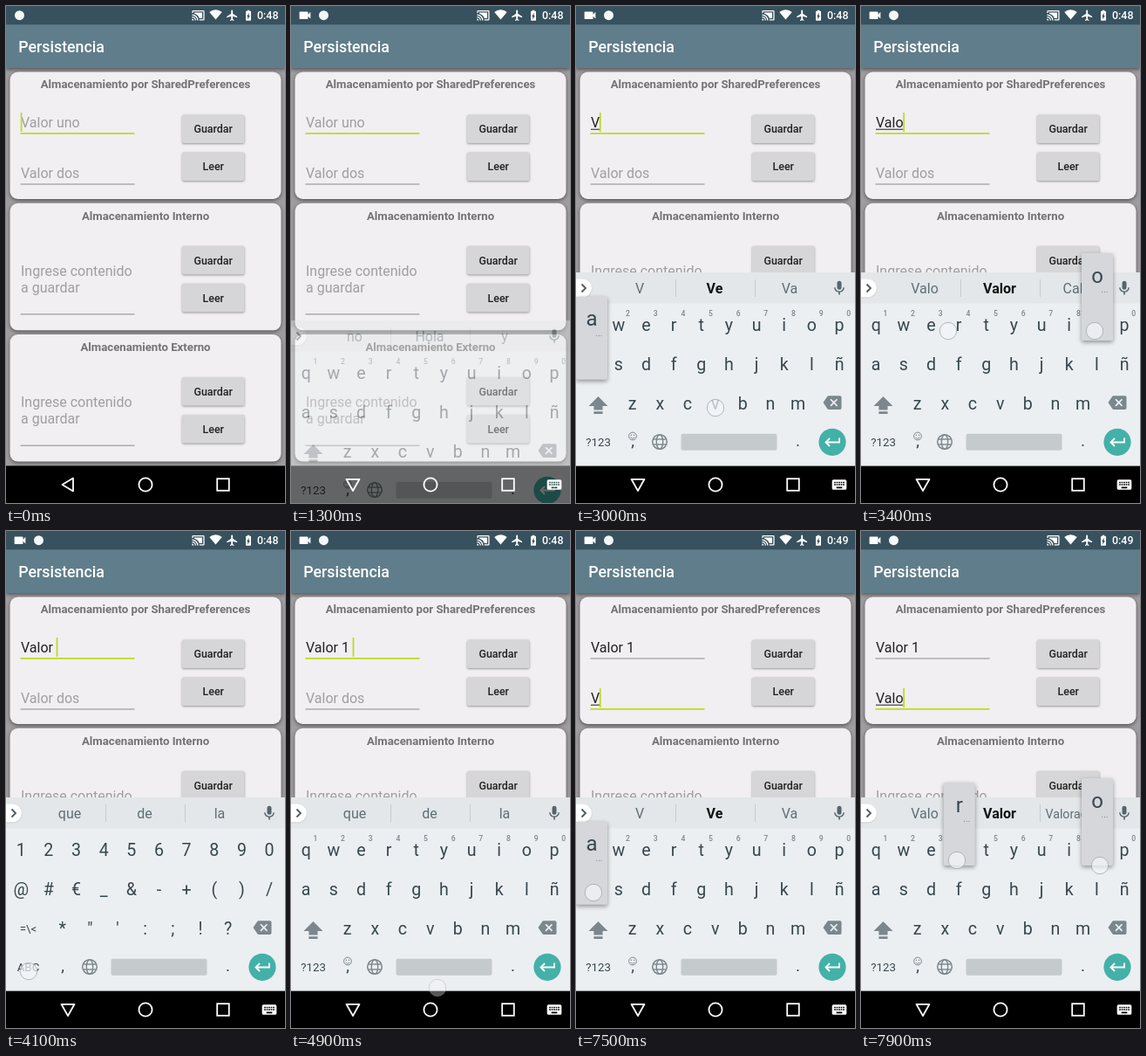
Animation of 320x569 px, one loop 8000 ms. Source, as an HTML page with a canvas:

```html
<!DOCTYPE html>
<html lang="es">
<head>
<meta charset="utf-8">
<title>Persistencia</title>
<style>
html, body { margin: 0; width: 100%; height: 100%; overflow: hidden; background: #000; }
canvas { display: block; width: 320px; height: 569px; }
</style>
</head>
<body>
<canvas id="stage"></canvas>
<script>
const W = 320, H = 569, LOOP = 8000;
const dpr = window.devicePixelRatio || 1;
const FONT = 'Roboto, "Noto Sans", sans-serif';
const GREEN = '#bddb27', KEY = '#37474f', GREY = '#7b878d', TEAL = '#43b1a8';

const stage = document.getElementById('stage');
const layer = document.createElement('canvas');
for (const c of [stage, layer]) { c.width = W * dpr; c.height = H * dpr; }
const main = stage.getContext('2d');
const kb = layer.getContext('2d');
main.scale(dpr, dpr);
kb.scale(dpr, dpr);
let g = main;

const ICON = {
  cast: 'M21 3H3a2 2 0 0 0-2 2v3h2V5h18v14h-7v2h7a2 2 0 0 0 2-2V5a2 2 0 0 0-2-2zM1 18v3h3a3 3 0 0 0-3-3zm0-4v2a5 5 0 0 1 5 5h2a7 7 0 0 0-7-7zm0-4v2a9 9 0 0 1 9 9h2A11 11 0 0 0 1 10zM5 7h14v10h-5a13 13 0 0 0-9-8z',
  wifi: 'M12 21 24 7a18 18 0 0 0-24 0z',
  plane: 'M21 16v-2l-8-5V3.5a1.5 1.5 0 0 0-3 0V9l-8 5v2l8-2.5V19l-2 1.5V22l3.5-1 3.5 1v-1.5L13 19v-5.5z',
  battery: 'M15.7 4H14V2h-4v2H8.3Q7 4 7 5.3v15.4Q7 22 8.3 22h7.4q1.3 0 1.3-1.3V5.3Q17 4 15.7 4zM11 20v-5.5H9L13 7v5.5h2z',
  camera: 'M17 10.5V7a1 1 0 0 0-1-1H4a1 1 0 0 0-1 1v10a1 1 0 0 0 1 1h12a1 1 0 0 0 1-1v-3.5l4 4v-11z',
  mic: 'M12 14a3 3 0 0 0 3-3V5a3 3 0 0 0-6 0v6a3 3 0 0 0 3 3zm5.3-3c0 3-2.5 5.1-5.3 5.1S6.7 14 6.7 11H5c0 3.4 2.7 6.2 6 6.7V21h2v-3.3c3.3-.5 6-3.3 6-6.7z',
  back: 'M22 3H7Q6 3 5.4 3.9L0 12l5.4 8.1Q6 21 7 21h15a2 2 0 0 0 2-2V5a2 2 0 0 0-2-2zm-3 12.6L17.6 17 14 13.4 10.4 17 9 15.6 12.6 12 9 8.4 10.4 7 14 10.6 17.6 7 19 8.4 15.4 12z',
  shift: 'M12 1 0 13h6.500v5h11v-5H24zM6.500 20h11v3h-11z',
  board: 'M20 5H4a2 2 0 0 0-2 2v10a2 2 0 0 0 2 2h16a2 2 0 0 0 2-2V7a2 2 0 0 0-2-2zm-9 3h2v2h-2zm0 3h2v2h-2zM8 8h2v2H8zm0 3h2v2H8zm-1 2H5v-2h2zm0-3H5V8h2zm9 7H8v-2h8zm0-4h-2v-2h2zm0-3h-2V8h2zm3 3h-2v-2h2zm0-3h-2V8h2z'
};
for (const k in ICON) ICON[k] = new Path2D(ICON[k]);

function icon(name, x, y, size, color) {
  g.save();
  g.translate(x - size / 2, y - size / 2);
  g.scale(size / 24, size / 24);
  g.fillStyle = color;
  g.fill(ICON[name], 'evenodd');
  g.restore();
}

function text(s, x, y, size, color, weight = 400, align = 'left') {
  g.font = `${weight} ${size}px ${FONT}`;
  g.fillStyle = color;
  g.textAlign = align;
  g.fillText(s, x, y);
}
const mid = (s, x, y, size, color, weight) => text(s, x, y, size, color, weight, 'center');

function rect(x, y, w, h, color) {
  g.fillStyle = color;
  g.fillRect(x, y, w, h);
}

function box(x, y, w, h, r, color, blur = 0, dy = 0, shade = 'rgba(0,0,0,.4)') {
  g.save();
  if (blur) {
    g.shadowColor = shade;
    g.shadowBlur = blur * dpr;
    g.shadowOffsetY = dy * dpr;
  }
  g.fillStyle = color;
  g.beginPath();
  g.roundRect(x, y, w, h, r);
  g.fill();
  g.restore();
}

function disc(x, y, r, color) {
  g.fillStyle = color;
  g.beginPath();
  g.arc(x, y, r, 0, 7);
  g.fill();
}

function line(points, color, width, close) {
  g.strokeStyle = color;
  g.lineWidth = width;
  g.beginPath();
  points.forEach(([x, y]) => g.lineTo(x, y));
  if (close) g.closePath();
  g.stroke();
}

function ring(x, y, rx, ry, color, width, a = 0, b = 7) {
  g.strokeStyle = color;
  g.lineWidth = width;
  g.beginPath();
  g.ellipse(x, y, rx, ry, 0, a, Math.min(b, a + 2 * Math.PI));
  g.stroke();
}

// Timeline: [time, value] pairs, the last one reached applies.
const at = (track, t) => track.reduce((v, [start, value]) => t >= start ? value : v, track[0][1]);

const FIRST = [[0, ''], [3000, 'V'], [3200, 'Va'], [3300, 'Val'], [3400, 'Valo'],
  [3600, 'Valor'], [3700, 'Valor '], [4500, 'Valor 1'], [4800, 'Valor 1 ']];
const SECOND = [[0, ''], [7500, 'V'], [7600, 'Va'], [7800, 'Val'], [7900, 'Valo']];
const CURSOR = [[0, 1], [700, 0], [1700, 1], [2200, 0], [2700, 1], [4200, 0], [4500, 1],
  [5300, 0], [5900, 1], [6800, 0], [7300, 1]];
const LAYOUT = [[0, 'abc'], [2700, 'ABC'], [3000, 'abc'], [4100, '123'], [4800, 'abc'],
  [7300, 'ABC'], [7500, 'abc']];
const SLIDE = [[0, [1, 0]], [1200, [105, .12]], [1300, [55, .42]], [1400, [16, .82]], [1500, [0, 1]]];
const HINTS = {
  '': 'no Hola y', V: 'V Ve Va', Va: 'Va Van Vale', Val: 'Val Vale Valor',
  Valo: 'Valo Valor Cali', Valor: 'Valor Valor Valores', 'Valor ': 'que de la',
  'Valor 1': ' 1 ', 'Valor 1 ': 'que de la'
};
// [from, to, x, y]
const TOUCHES = [
  [1100, 1200, 80, 134], [2600, 2800, 26, 458], [2900, 3100, 160, 460], [3100, 3200, 20, 414],
  [3200, 3300, 272, 414], [3300, 3500, 268, 372], [3400, 3500, 100, 372], [3500, 3700, 105, 374],
  [3700, 3800, 168, 510], [4000, 4200, 26, 504], [4400, 4600, 20, 372], [4700, 4900, 168, 510],
  [4900, 5000, 168, 523, .5], [6300, 6500, 82, 191], [7200, 7400, 26, 458], [7400, 7500, 160, 460],
  [7500, 7700, 20, 414], [7700, 7800, 272, 414], [7800, 7900, 268, 374], [7900, 8000, 274, 383],
  [7900, 8000, 110, 377]
];
// [from, to, letter, column, row]
const POPUPS = [
  [2900, 3000, 'V', 4.5, 2], [3000, 3200, 'a', 0, 1], [3200, 3300, 'l', 8, 1],
  [3300, 3500, 'o', 8, 0], [3500, 3600, 'r', 3, 0], [4400, 4600, '1', 0, 0],
  [7400, 7500, 'V', 4.5, 2], [7500, 7700, 'a', 0, 1], [7700, 7800, 'l', 8, 1],
  [7800, 8000, 'o', 8, 0], [7900, 8000, 'r', 3, 0]
];
const keyX = col => 17.200 + 31.65 * col;
const keyY = row => 366 + 44.7 * row;

function statusBar(t) {
  rect(0, 0, W, 21.3, '#37515e');
  if (t >= 100) icon('camera', 16, 10.7, 17, '#fff');
  disc(t >= 100 ? 37.5 : 15.5, 10.7, 5.5, '#f4f6f7');
  icon('cast', 220.5, 10.7, 15.5, '#fff');
  icon('wifi', 240.5, 10, 14.500, '#fff');
  icon('plane', 259.5, 10.7, 15, '#fff');
  icon('battery', 278, 10.7, 14.5, '#fff');
  text(t >= 6300 ? '0:49' : '0:48', 312.5, 15.2, 12.44, '#fff', 500, 'right');
}

function card(y, title) {
  box(4.5, y, 311, 145.5, 9, '#f1eff2', 4, 1.5, 'rgba(0,0,0,.5)');
  mid(title, 160, y + 18.8, 13.2, '#747274', 700);
  [['Guardar', 49], ['Leer', 92]].forEach(([label, dy]) => {
    box(202, y + dy, 71.5, 32.5, 2, '#d6d6d8', 2.5, 1, 'rgba(0,0,0,.38)');
    mid(label, 237.7, y + dy + 20.8, 12.44, '#212121', 500);
  });
}

function field(value, hint, base, focus, cursor) {
  text(value || hint, 17, base, 16, value ? '#212121' : '#a09ea1');
  const w = g.measureText(value).width;
  if (focus) {
    rect(16.5, base + 6, 131, 1.8, GREEN);
    if (value && !value.includes(' ')) rect(17, base + 1.7, w, 1, '#212121');
    if (cursor) rect(16.7 + w, base - 17, 1.8, 22, GREEN);
  } else {
    rect(16.5, base + 6.5, 131, 1, '#8b898c');
  }
}

function app(t) {
  rect(0, 0, W, H, '#a09d a0'.replace(' ', ''));
  g.save();
  g.shadowColor = 'rgba(0,0,0,.45)';
  g.shadowBlur = 4 * dpr;
  g.shadowOffsetY = 1.5 * dpr;
  rect(0, 21, W, 50, '#607d8b');
  g.restore();
  statusBar(t);
  text('Persistencia', 14.2, 53, 17.78, '#fff', 500);
  card(75.5, 'Almacenamiento por SharedPreferences');
  card(225.8, 'Almacenamiento Interno');
  card(376.1, 'Almacenamiento Externo');
  const second = t >= 6300, cursor = at(CURSOR, t);
  field(second ? 'Valor 1' : at(FIRST, t), 'Valor uno', 139, !second, cursor);
  field(at(SECOND, t), 'Valor dos', 197, second, cursor);
  [309, 459.3].forEach(y => {
    text('Ingrese contenido', 17, y, 16, '#a09ea1');
    text('a guardar', 17, y + 18.8, 16, '#a09ea1');
    rect(16.5, y + 43.4, 131, 1, '#8b898c');
  });
}

function suggestions(t) {
  rect(0, 305, W, 35.5, '#e3e7e9');
  box(-10, 312.5, 28, 21, 10.5, '#fff', 1.5, .5, 'rgba(0,0,0,.2)');
  line([[6.5, 318.5], [11, 323], [6.5, 327.5]], '#4d5a61', 1.8);
  [114.5, 205.5].forEach(x => rect(x - .5, 313, 1, 20, '#c6cbce'));
  const typed = t >= 6300 ? at(SECOND, t) : at(FIRST, t);
  let words = HINTS[typed].split(' ');
  if (typed === 'Valo' && t >= 6300) words[2] = 'Valoración';
  const bold = typed && !typed.includes(' ');
  words.forEach((w, i) => {
    const strong = bold && i === 1;
    mid(w, 73 + 86 * i, 329, w.length > 8 ? 14.2 : 16, strong ? '#111' : '#5f6e76', strong ? 700 : 400);
  });
  icon('mic', 302, 323, 20, '#56646b');
}

function bottomRow(symbols) {
  mid(symbols ? 'ABC' : '?123', 25.5, 504, 13.3, KEY);
  if (!symbols) {
    ring(65, 492.5, 4.4, 4.4, GREY, 1);
    ring(65, 493, 2.300, 2.2, GREY, .9, .3, 2.84);
    disc(63.4, 491.3, .7, GREY);
    disc(66.6, 491.3, .7, GREY);
  }
  mid(',', 65, 504, 19, KEY);
  ring(96, 499, 8.3, 8.3, GREY, 1.5);
  ring(96, 499, 3.7, 8.3, GREY, 1.4);
  line([[88.5, 496], [103.5, 496]], GREY, 1.4);
  line([[88.5, 502], [103.5, 502]], GREY, 1.4);
  box(120.5, 489.7, 110, 19, 2, '#c5cacd');
  mid('.', 254.5, 504, 19, KEY);
  disc(294, 499.3, 15.6, TEAL);
  line([[302, 494.5], [302, 499.5], [287, 499.5]], '#fff', 1.8);
  line([[291, 495], [286.5, 499.5], [291, 504]], '#fff', 1.8);
}

function keyboard(t) {
  const mode = at(LAYOUT, t), symbols = mode === '123', caps = mode === 'ABC';
  const rows = symbols ? ['1234567890', '@#€_&-+()/', '*"\':;!?'] : ['qwertyuiop', 'asdfghjklñ', 'zxcvbnm'];
  rect(0, 305, W, 221.5, '#eceff1');
  suggestions(t);
  rows.forEach((row, r) => [...row].forEach((ch, i) => {
    const x = keyX(i + (r === 2 ? 1.5 : 0));
    mid(caps ? ch.toUpperCase() : ch, x, keyY(r) + 6.3, 19.6, KEY);
    if (!r && !symbols) mid((i + 1) % 10, x + 10.7, 355, 8.6, GREY, 500);
  }));
  if (symbols) mid('=\\<', 25.5, 460, 13.3, KEY);
  else icon('shift', 25.5, 457, 22, caps ? TEAL : GREY);
  icon('back', 294, 454, 21, GREY);
  bottomRow(symbols);
}

function popups(t) {
  POPUPS.forEach(([from, to, ch, col, row]) => {
    if (t < from || t >= to) return;
    const x = Math.max(18, keyX(col) + .6), y = keyY(row);
    const drop = t < from + 100 ? 5 : 0;
    box(x - 18, y - 83 + drop, 36, 100 - drop, 2, '#d5d7db', 5, 2);
    mid(ch, x, y - 49.500 + drop, 24, KEY);
    if (ch !== 'V') mid('...', x + 8.5, y - 38 + drop, 10, GREY);
  });
}

function touches(t) {
  TOUCHES.forEach(([from, to, x, y, alpha = 1]) => {
    if (t < from || t >= to) return;
    g.globalAlpha = alpha;
    disc(x, y, 10, 'rgba(244,246,249,.7)');
    ring(x, y, 9.7, 9.7, 'rgba(125,130,138,.6)', .9);
    g.globalAlpha = 1;
  });
}

function navIcons(open) {
  const back = open ? [[63.5, 541.8], [78.5, 541.8], [71, 555]] : [[64.5, 548], [77, 540.6], [77, 555.4]];
  g.lineJoin = 'round';
  line(back, '#fff', 1.8, true);
  g.lineJoin = 'miter';
  ring(160, 548, 7.6, 7.6, '#fff', 1.8);
  g.strokeRect(242.2, 541.2, 13.6, 13.6);
  if (open) icon('board', 302, 548, 20, '#fff');
}

function draw(time) {
  const t = Math.floor(time % LOOP / 100) * 100;
  const [shift, alpha] = at(SLIDE, t);
  g = main;
  app(t);
  rect(0, 526.4, W, 43, '#000');
  if (alpha) {
    g = kb;
    g.clearRect(0, 0, W, H);
    keyboard(t);
    g = main;
    g.globalAlpha = alpha;
    g.drawImage(layer, 0, shift, W, H);
    g.globalAlpha = 1;
  }
  navIcons(alpha > 0);
  popups(t);
  touches(t);
}

let start;
function tick(now) {
  if (start === undefined) start = now;
  draw(now - start);
  requestAnimationFrame(tick);
}
draw(0);
requestAnimationFrame(tick);
</script>
</body>
</html>
```
